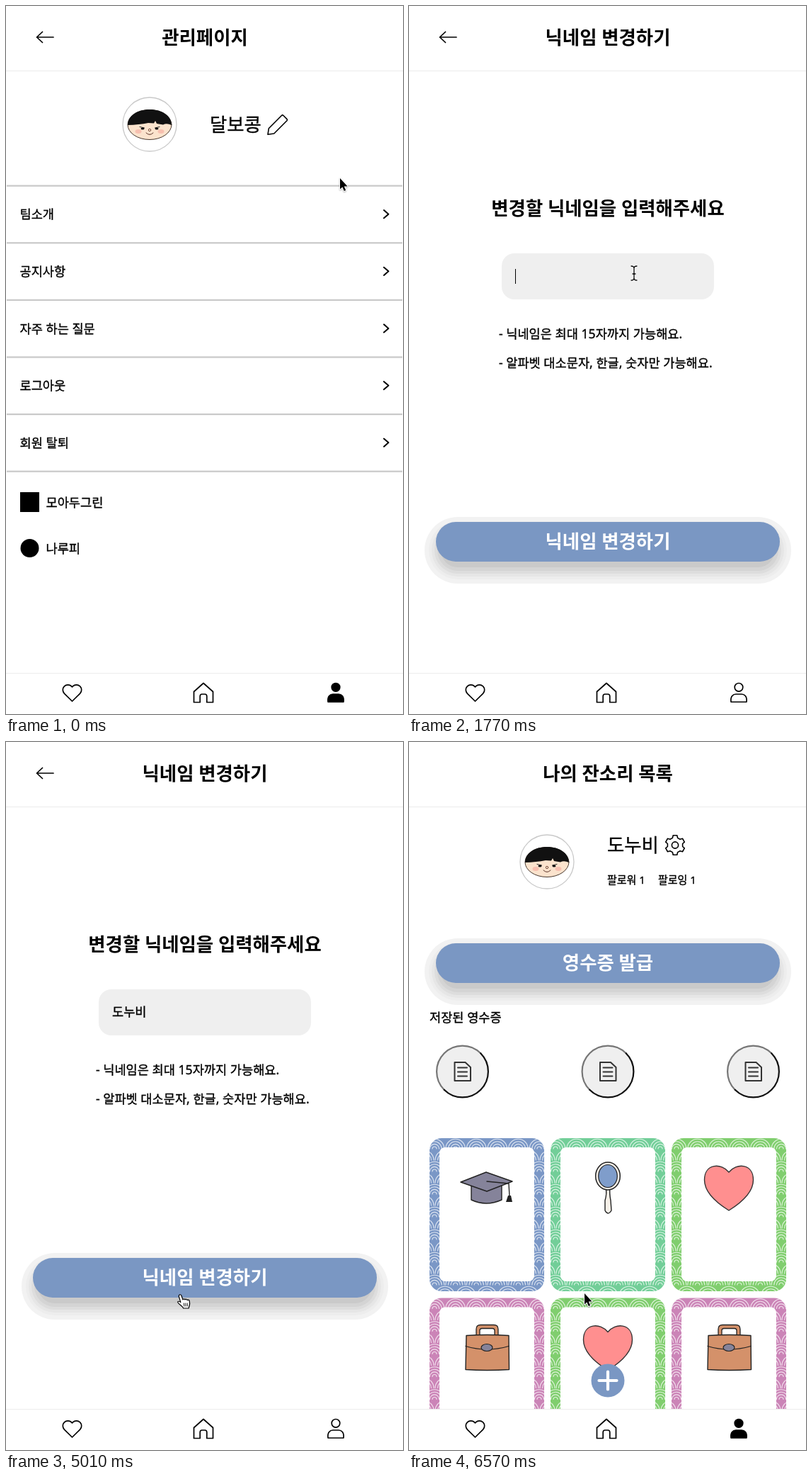
An HTML page with a canvas that plays this animation: 561 by 999 pixels, repeating every 6600 ms.

```html
<!DOCTYPE html>
<html lang="ko">
<head>
<meta charset="utf-8">
<title>관리페이지</title>
<style>
html, body { margin: 0; width: 100%; height: 100%; overflow: hidden; background: #fff; }
canvas { display: block; width: 561px; height: 999px; }
</style>
</head>
<body>
<canvas id="stage"></canvas>
<script>
const W = 561, H = 999, LOOP = 6600;
const BLUE = '#7a97c3', TEAL = '#72ce98', GREEN = '#80ce6e', PINK = '#cb84b7';
const FONT = '"Noto Sans", "Noto Sans CJK KR", "Noto Sans KR", "Noto Sans CJK JP", sans-serif';
const EDIT_AT = 960, LIST_AT = 5370, BLUR_AT = 4560, BLINK = 444;

// Hangul composition steps: time, field content
const KEYS = [[3120, 'ㄷ'], [3180, '도'], [3270, '돈'], [3360, '도누'], [3540, '도눕'], [3870, '도누비']];
const OLD_NAME = '달보콩', NEW_NAME = KEYS[KEYS.length - 1][1];

const canvas = document.getElementById('stage');
const dpr = window.devicePixelRatio || 1;
canvas.width = W * dpr;
canvas.height = H * dpr;
const c = canvas.getContext('2d');

function text(str, x, y, size = 17.6) {
  c.font = `400 ${size}px ${FONT}`;
  c.textAlign = 'left';
  c.fillStyle = c.strokeStyle = '#000';
  c.lineWidth = 0.35;
  c.fillText(str, x, y);
  c.strokeText(str, x, y);
}
function title(str, y, color = '#000') {
  c.font = `700 26.4px ${FONT}`;
  c.textAlign = 'center';
  c.fillStyle = color;
  c.fillText(str, 281, y);
}

function paint(path, fill, stroke, width = 1.8) {
  if (fill) { c.fillStyle = fill; c.fill(path); }
  if (stroke) { c.strokeStyle = stroke; c.lineWidth = width; c.stroke(path); }
}
const draw = (d, fill, stroke, width) => paint(new Path2D(d), fill, stroke, width);

function oval(x, y, rx, ry, fill, stroke, width) {
  const p = new Path2D();
  p.ellipse(x, y, rx, ry, 0, 0, Math.PI * 2);
  paint(p, fill, stroke, width);
}
function box(x, y, w, h, r, fill) {
  const p = new Path2D();
  p.roundRect(x, y, w, h, r);
  paint(p, fill);
  return p;
}
function rect(x, y, w, h, color) {
  c.fillStyle = color;
  c.fillRect(x, y, w, h);
}
function at(x, y, fn) {
  c.save();
  c.translate(x, y);
  fn();
  c.restore();
}

function header(name, back) {
  title(name, 54);
  if (back) draw('M67 44H43.5M51.5 36.5L43.5 44L51.5 51.5', null, '#000', 1.7);
  rect(0, 91, W, 1.2, '#eee');
}

function nav(active) {
  rect(0, 941, W, 58, '#fff');
  rect(0, 941, W, 1.2, '#eee');
  draw('M93.5 981L82.4 970.1A7.2 7.2 0 0 1 92.6 959.9L93.5 960.8L94.4 959.9A7.2 7.2 0 0 1 104.6 970.1Z', null, '#000', 1.7);
  draw('M279 955.5L265.5 967.5V982.5H274.2V974Q274.2 971 277 971H281Q283.8 971 283.8 974V982.5H292.5V967.5Z', null, '#000', 1.7);
  const fill = active ? '#000' : null;
  oval(466, 961.3, 5.8, 5.8, fill, '#000', 1.7);
  draw('M455 982C454 974 458 971 462 971H470C474 971 478 974 477 982Z', fill, '#000', 1.7);
}

function avatar(x, y) {
  at(x, y, () => {
    oval(0, 0, 38, 38, '#fff', '#c9c9c9', 1.3);
    oval(0, 0.5, 31, 21, '#fbe3cd', '#4a3a30', 1);
    draw('M-31 1C-31 -12 -18 -21 0 -21S31 -12 31 1Q24 -2 19 .5L10 -1L8 -5L6 -1.5L-2 -2Q-15 .5 -31 1Z', '#111');
    for (const s of [-1, 1]) {
      oval(s * 16, 10, 4.5, 3, '#f7c0b0');
      draw(`M${s * 14} 3.5L${s * 7.5} 5`, null, '#222', 1);
      oval(s * 10, 6, 2.5, 1.5, '#111');
    }
    oval(0, 8, 1.7, 1.7, null, '#6b4030', 0.9);
    draw('M-5 12Q0 17 5 12', null, '#5a3328', 1);
  });
}

function button(label, y) {
  const bands = [[19, 242], [13, 237], [9, 230], [5, 221], [1, 212], [-4, 202]];
  for (const [e, g] of bands) {
    const h = 56 + e * 2;
    box(41 - e, y + 12 - e, 480 + e * 2, h, h / 2, `rgb(${g},${g},${g})`);
  }
  box(38, y, 486, 56, 28, BLUE);
  title(label, y + 37, '#fff');
}

function settingsPage() {
  header('관리페이지', true);
  avatar(203, 167);
  text(OLD_NAME, 288, 177, 26.4);
  draw('M370 181.3L371.3 172.8L389.5 154.5Q390.7 153.3 391.9 154.5L397 159.6Q398 160.7 397 161.8L378.8 180Z', null, '#000', 1.6);
  ['팀소개', '공지사항', '자주 하는 질문', '로그아웃', '회원 탈퇴'].forEach((label, i) => {
    const y = 293.7 + i * 80.6;
    text(label, 19.5, y + 6.6);
    draw(`M534 ${y - 5.6}L540.5 ${y}L534 ${y + 5.6}`, null, '#000', 2);
  });
  for (let i = 0; i < 6; i++) rect(1, 252.6 + i * 80.6, 559, 2.2, '#c9c9c9');
  rect(20, 686, 27, 28, '#000');
  text('모아두그린', 56.5, 706.5);
  oval(33.5, 765, 13, 13, '#000');
  text('나루피', 56.5, 772);
  nav(true);
}

function field(t) {
  box(131, 349, 300, 65, 18, '#efefef');
  let value = '', last = 882;
  for (const [time, str] of KEYS) if (t >= time) { value = str; last = time; }
  text(value, 150, 387);
  if (t >= BLUR_AT) return;
  const end = 150 + c.measureText(value).width;
  if (value) {
    const start = 150 + c.measureText(value.slice(0, -1)).width;
    rect(start, 389.5, end - start, 1, '#000');
  }
  if (Math.floor((t - last) / BLINK) % 2 === 0) rect(Math.round(end), 371, 1, 21, '#000');
}

function editPage(t) {
  header('닉네임 변경하기', true);
  title('변경할 닉네임을 입력해주세요', 294.5);
  field(t);
  text('- 닉네임은 최대 15자까지 가능해요.', 127, 469);
  text('- 알파벳 대소문자, 한글, 숫자만 가능해요.', 127, 510);
  button('닉네임 변경하기', 728);
  nav(false);
}

function gear(x, y) {
  const p = new Path2D();
  for (let i = 0; i < 6; i++) {
    for (const [off, r] of [[-0.34, 10.8], [-0.2, 14], [0.2, 14], [0.34, 10.8]]) {
      const a = i * Math.PI / 3 - Math.PI / 2 + off;
      p.lineTo(x + r * Math.cos(a), y + r * Math.sin(a));
    }
  }
  p.closePath();
  paint(p, null, '#000', 1.6);
  oval(x, y, 4.6, 4.6, null, '#000', 1.6);
}

function receipt(x) {
  at(x, 465, () => {
    oval(0, 0, 36.5, 36.5, '#efefef');
    for (const [from, color] of [[0.75, '#767676'], [1.75, '#111']]) {
      const p = new Path2D();
      p.arc(0, 0, 36.4, from * Math.PI, (from + 1) * Math.PI);
      paint(p, null, color, 2.2);
    }
    draw('M-11 -13H4L11.5 -6V13H-11ZM-6.5 -5.5H6.5M-6.5 .5H6.5M-6.5 6.5H6.5', null, '#333', 2);
  });
}

function frame(x, y, color) {
  const pitch = 29.6;
  c.save();
  c.clip(box(x, y, 162, 216, 17, color));
  c.strokeStyle = 'rgba(255,255,255,.75)';
  c.lineWidth = 1.1;
  for (let row = 0; row < 15; row++) {
    const base = y + 15 + row * 16;
    for (let i = 0; i < 7; i++) {
      const fx = x + 7 + (i - (row % 2) / 2) * pitch;
      for (let r = 3; r <= 14; r += 3.6) {
        c.beginPath();
        c.arc(fx, base, r, Math.PI, 0);
        c.stroke();
      }
    }
  }
  box(x + 14, y + 13, 134, 189, 8, '#fff');
  c.restore();
}

function cap() {
  draw('M59 66V87Q80 97 102 87V66Z', '#85839a', '#222', 1.4);
  draw('M44 62L80 48L117 61L81 75Z', '#85839a', '#222', 1.4);
  draw('M81 61L112 64L113 82', null, '#222', 1.4);
  draw('M111 81H115L117 90H108Z', '#222');
}
function mirror() {
  draw('M78 70Q80 78 77 88V102Q81 110 86 102L85 88Q83 78 84 70Z', '#f6f0e8', '#222', 1.4);
  oval(81, 53.5, 17.3, 19.5, '#f6f0e8', '#222', 1.5);
  oval(81, 53.5, 13.3, 16, '#7f9dcb', '#222', 1.2);
}
function heart() {
  draw('M81 48C91 35 115.5 35 115.5 59C115.5 78 95.5 93 81 102C66.5 93 46.5 78 46.5 59C46.5 35 71 35 81 48Z', '#ff8f8f', '#333', 1.4);
}
function bag() {
  draw('M66 54V44Q66 38 72 38H91Q97 38 97 44V54H92V46Q92 43 89 43H74Q71 43 71 46V54Z', '#d4916a', '#222', 1.3);
  draw('M52 53Q81 51 112 53L112.5 101Q81 103 51 101Z', '#d4916a', '#222', 1.4);
  draw('M51 68Q81 77 112 68', null, '#222', 1.3);
  oval(81, 70, 8, 5, '#85839a', '#222', 1.2);
}

const CARDS = [['#7a97c6', cap], [TEAL, mirror], [GREEN, heart], [PINK, bag], [GREEN, heart], [PINK, bag]];

function listPage() {
  header('나의 잔소리 목록', false);
  avatar(195, 169);
  text(NEW_NAME, 280, 155, 26.4);
  gear(376, 145.5);
  text('팔로워 1', 280, 199.5, 15);
  text('팔로잉 1', 352, 199.5, 15);
  button('영수증 발급', 284);
  text('저장된 영수증', 29, 394.5);
  [75.5, 281, 486.5].forEach(receipt);
  CARDS.forEach(([color, icon], i) => {
    const x = 29 + (i % 3) * 171, y = 559 + Math.floor(i / 3) * 225.5;
    frame(x, y, color);
    at(x, y, icon);
  });
  oval(281, 901, 23.5, 23.5, BLUE);
  draw('M268.5 901H293.5M281 888.5V913.5', null, '#fff', 4.2);
  nav(true);
}

const CURSORS = {
  arrow() {
    c.shadowColor = 'rgba(0,0,0,.3)';
    c.shadowBlur = 2 * dpr;
    c.shadowOffsetY = dpr;
    const d = 'M0 0V15.5L3.4 12.4L5.8 18L8.2 17L5.8 11.6H10.6Z';
    draw(d, null, '#fff', 2);
    c.shadowColor = 'transparent';
    draw(d, '#000');
  },
  hand() {
    c.translate(-2, 2);
    draw('M-1.8 2C-2 -.5 1 -1 1.8 1L4 7C4 5.4 6.6 5.4 7 7C7.6 5.8 9.6 6 10 7.6C10.8 6.6 13 7 13.2 9L13.6 12C13.8 14.5 12.6 16 12.2 19H4.6C4 16.5 -.5 14.5 -3 11C-4 9 -1.5 8.5 .8 10.6Z', '#fff', '#000', 1.2);
    draw('M5.4 12L5.8 16M7.8 12L8.1 16M10.2 12L10.4 16', null, '#000', 0.9);
  },
  beam() {
    const d = 'M-4 -10Q0 -10 0 -7Q0 -10 4 -10M0 -7V7M-4 10Q0 10 0 7Q0 10 4 10M-2 1H2';
    draw(d, null, '#fff', 2.6);
    draw(d, null, '#000', 1.3);
  }
};

// Pointer moves: start, end, from, to
const MOVES = [
  [30, 690, [472, 243], [393, 166]],
  [990, 1200, [393, 166], [318, 377]],
  [4080, 4530, [318, 377], [248, 778]]
];

function pointer(t) {
  if (t >= 1980 && t < 4080) return;
  let [x, y] = MOVES[0][2];
  for (const [t0, t1, a, b] of MOVES) {
    if (t < t0) break;
    const p = Math.min(1, (t - t0) / (t1 - t0)), e = p * p * (3 - 2 * p);
    x = a[0] + (b[0] - a[0]) * e;
    y = a[1] + (b[1] - a[1]) * e;
  }
  let shape = 'arrow';
  if (t < EDIT_AT) {
    if (x < 399 && y < 183) shape = 'hand';
  } else if (t < LIST_AT) {
    if (y > 349 && y < 414) shape = 'beam';
    else if (y > 728) shape = 'hand';
  }
  at(x, y, CURSORS[shape]);
}

function render(now) {
  const t = now % LOOP;
  c.setTransform(dpr, 0, 0, dpr, 0, 0);
  c.lineJoin = c.lineCap = 'round';
  rect(0, 0, W, H, '#fff');
  if (t < EDIT_AT) settingsPage();
  else if (t < LIST_AT) editPage(t);
  else listPage();
  pointer(t);
}

const start = performance.now();
function tick() {
  render(performance.now() - start);
  requestAnimationFrame(tick);
}
tick();
</script>
</body>
</html>
```
